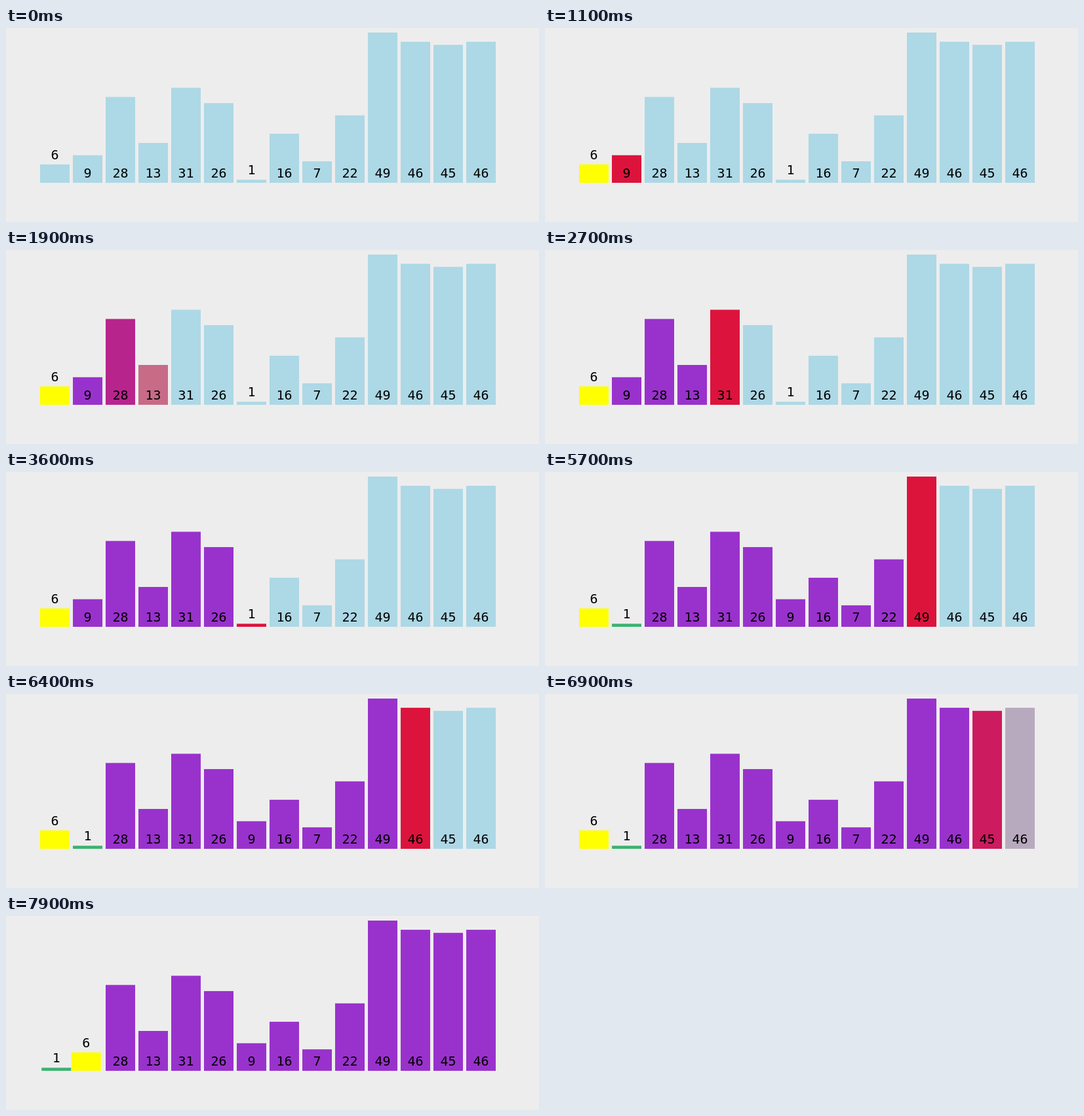
Recreate the animation shown at these times as an HTML page with a canvas. Size 813x297 px, loop 8000 ms.

```html
<!DOCTYPE html>
<html lang="en">
<head>
<meta charset="utf-8">
<title>Quick sort partition</title>
<style>
  html, body { margin: 0; width: 100%; height: 100%; overflow: hidden; background: #ededed; }
  canvas { display: block; }
</style>
</head>
<body>
<canvas id="stage" width="813" height="297"></canvas>
<script>
const ctx = document.getElementById('stage').getContext('2d');
const LOOP = 8000, TICK = 100, FADE = 250;
const BASE = 237, LEFT = 52, PITCH = 50, WIDTH = 45, SCALE = 230 / 49;

const BLUE = [173, 216, 230], YELLOW = [255, 255, 0], RED = [220, 20, 60],
      PURPLE = [153, 50, 204], GREEN = [60, 179, 113];

const values = [6, 9, 28, 13, 31, 26, 1, 16, 7, 22, 49, 46, 45, 46];
const starts = [405, 870, 1305, 1770, 2205, 2670, 3170, 3592, 4070,
                4506, 5005, 5470, 5905, 6370, 6803, 7305, 7706];

// Each step lists the bars it recolours or moves.
const paint = (bar, color) => ({ bar, color });
const move = (bar, slot) => ({ bar, slot });
const steps = [[paint(0, YELLOW)], [paint(1, RED)]];
for (let i = 2; i <= 6; i++) steps.push([paint(i - 1, PURPLE), paint(i, RED)]);
steps.push([move(1, 6), move(6, 1)]);
steps.push([paint(6, GREEN), paint(7, RED)]);
for (let i = 8; i <= 13; i++) steps.push([paint(i - 1, PURPLE), paint(i, RED)]);
steps.push([paint(13, PURPLE)]);
steps.push([move(0, 1), move(6, 0)]);

const ease = p => p < 0.5 ? 4 * p ** 3 : 1 - 4 * (1 - p) ** 3;
const mix = (a, b, p) => a + (b - a) * p;

function barsAt(t) {
  const bars = values.map((value, slot) => ({ value, slot, color: BLUE }));
  steps.forEach((changes, i) => {
    if (t <= starts[i]) return;
    const p = ease(Math.min(1, (t - starts[i]) / FADE));
    for (const { bar, color, slot } of changes) {
      const b = bars[bar];
      if (color) b.color = b.color.map((c, k) => mix(c, color[k], p));
      else b.slot = mix(b.slot, slot, p);
    }
  });
  return bars;
}

function draw(t) {
  ctx.fillStyle = '#ededed';
  ctx.fillRect(0, 0, 813, 297);
  const bars = barsAt(t);
  for (const { value, slot, color } of bars) {
    ctx.fillStyle = `rgb(${color.map(Math.round)})`;
    ctx.fillRect(LEFT + PITCH * slot, BASE - value * SCALE, WIDTH, value * SCALE);
  }
  ctx.fillStyle = '#000';
  ctx.font = '20px "DejaVu Sans Mono", monospace';
  ctx.textAlign = 'center';
  for (const { value, slot } of bars) {
    const height = value * SCALE;
    const foot = height < 30 ? BASE - height : BASE;
    ctx.fillText(value, LEFT + PITCH * slot + WIDTH / 2, Math.round(foot - 8));
  }
}

const begin = performance.now();
function frame() {
  const t = (performance.now() - begin) % LOOP;
  draw(Math.floor(t / TICK) * TICK);
  requestAnimationFrame(frame);
}
frame();
</script>
</body>
</html>
```
